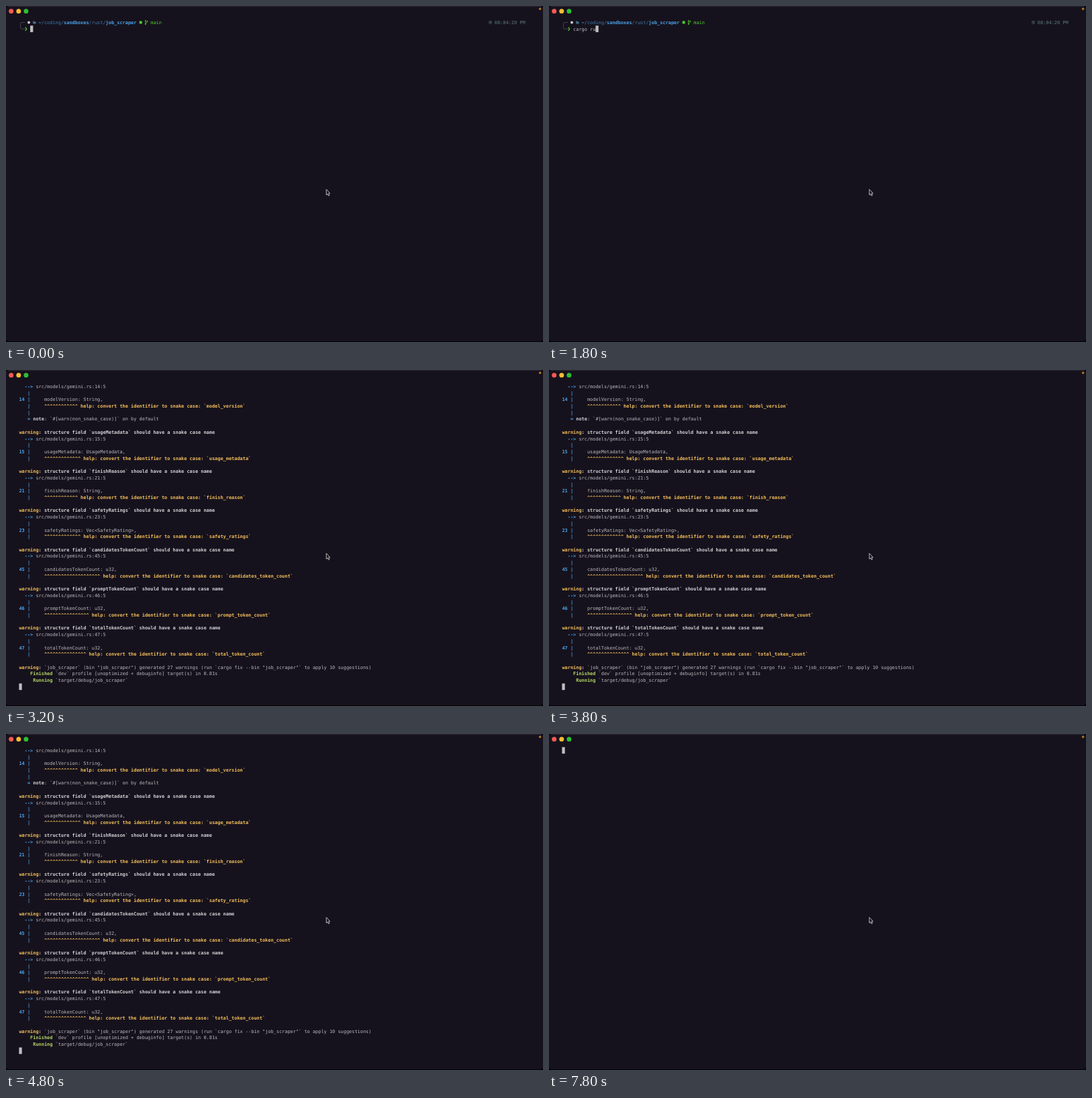
Write an HTML page with a canvas that moves like this. It is 800 px wide and 500 px high and loops after 8 s.

```html
<!DOCTYPE html>
<html lang="en">
<head>
<meta charset="utf-8">
<title>Terminal session</title>
<style>
  html, body { margin: 0; width: 100%; height: 100%; overflow: hidden; background: #000; }
  canvas { display: block; }
</style>
</head>
<body>
<canvas id="stage" width="800" height="500"></canvas>
<script>
const ctx = document.getElementById('stage').getContext('2d');
const LOOP = 8000, LEFT = 19.4, TOP = 19.5, CELL = 4.167, ROW = 9.717, SIZE = 6.92;
const TEXT = '#b9b8bc', BRIGHT = '#d2d1d5', YELLOW = '#f3be5a', BLUE = '#4ba3ea',
      PATH = '#3f7cab', GREEN = '#51c92d', LIME = '#b3d465', FRAME = '#5b595f', CLOCK = '#5b7c7c';

const COMMAND = 'cargo run';
const KEY_TIMES = [200, 400, 800, 1000, 1200, 1400, 1600, 1800, 2000];
const ENTER = 2200, OUTPUT = 3200, BANNER = 5200, CLEAR = 7800;

const FIELDS = [
  ['modelVersion', 'String', 14],
  ['usageMetadata', 'UsageMetadata', 15],
  ['finishReason', 'String', 21],
  ['safetyRatings', 'Vec<SafetyRating>', 23],
  ['candidatesTokenCount', 'u32', 45],
  ['promptTokenCount', 'u32', 46],
  ['totalTokenCount', 'u32', 47],
];

const LOGO = String.raw`
       __           __     _____    __            __    __
      / /  ____    / /_   / ___/   / /_   ___    / /   / /
 __  / /  / __ \  / __ \  \__ \   / __ \ / _ \  / /   / /
/ /_/ /  / /_/ / / /_/ / ___/ /  / / / //  __/ / /   / /
\____/   \____/ /_.___/ /____/  /_/ /_/ \___/ /_/   /_/`.split('\n').slice(1);

const cellX = col => LEFT + col * CELL;
const rowY = row => TOP + row * ROW;

// Writes text on the character grid and returns the next free column.
function put(row, col, text, color = TEXT, bold = false) {
  ctx.font = `${bold ? 'bold ' : ''}${SIZE}px "DejaVu Sans Mono", monospace`;
  ctx.fillStyle = color;
  for (const char of text) {
    if (char !== ' ') ctx.fillText(char, cellX(col), rowY(row) + 7.35);
    col++;
  }
  return col;
}

function dot(x, y, r, color) {
  ctx.fillStyle = color;
  ctx.beginPath();
  ctx.arc(x, y, r, 0, 7);
  ctx.fill();
}

function line(d, color, width = 0.7) {
  ctx.strokeStyle = color;
  ctx.lineWidth = width;
  ctx.stroke(new Path2D(d));
}

function shape(d, color) {
  ctx.fillStyle = color;
  ctx.fill(new Path2D(d));
}

function cursor(row, col) {
  ctx.fillStyle = '#bfbec2';
  ctx.fillRect(cellX(col), rowY(row), 4.3, 9.7);
}

function drawWindow() {
  ctx.fillStyle = '#000';
  ctx.fillRect(0, 0, 800, 500);
  ctx.fillStyle = '#16121d';
  ctx.beginPath();
  ctx.roundRect(0, 0, 800, 499, 4);
  ctx.fill();
  ctx.fillStyle = '#35323b';
  ctx.fillRect(3, 0, 794, 0.7);
  dot(7.7, 7.7, 3.5, '#fb5a50');
  dot(18.8, 7.7, 3.5, '#fbbb35');
  dot(29.9, 7.7, 3.5, '#2cbf35');
  dot(795.6, 4.3, 1.7, '#b9761f');
}

function drawPrompt() {
  line('M28 24.5H23.5Q21.5 24.5 21.5 26.5V32Q21.5 34.2 23.5 34.2H28', FRAME);
  line('M28.7 31.6L30.7 34.2L28.7 36.8', GREEN, 1.3);
  dot(34, 24.4, 2, '#cfced2');
  shape('M40.3 22.5H42L42.6 23.2H44L45 24.7L44 26.5H40.3Z', '#43718f');

  let col = put(0, 7, '~', BLUE, true);
  col = put(0, col, '/coding/', PATH);
  col = put(0, col, 'sandboxes', BLUE, true);
  col = put(0, col, '/rust/', PATH);
  put(0, col, 'job_scraper', BLUE, true);

  ctx.fillStyle = GREEN;
  ctx.fillRect(198.7, 22.4, 4, 4);
  line('M207.8 22V27.2M207.8 25.5Q210.4 25.3 210.4 23', GREEN, 0.8);
  dot(207.8, 21.9, 0.9, GREEN);
  dot(207.8, 27, 0.9, GREEN);
  dot(210.4, 22.7, 0.9, GREEN);
  put(0, 47, 'main', GREEN);

  line('M719.5 24.4a2 2 0 1 0 4 0a2 2 0 1 0 -4 0M721.5 23.2V24.5H722.5', CLOCK, 0.7);
  put(0, 170, '08:04:20 PM', CLOCK);
}

function drawField([name, type, lineNo], row) {
  const snake = name.replace(/[A-Z]/g, c => '_' + c.toLowerCase());
  put(row, 2, '-->', BLUE, true);
  put(row, 6, `src/models/gemini.rs:${lineNo}:5`);
  for (const r of [1, 2, 3]) put(row + r, 3, '|', BLUE, true);
  put(row + 2, 0, String(lineNo), BLUE, true);
  put(row + 2, 9, `${name}: ${type},`);
  put(row + 3, 9, `${'^'.repeat(name.length)} help: convert the identifier to snake case: \`${snake}\``, YELLOW, true);
}

function drawOutput() {
  FIELDS.forEach((field, i) => {
    const row = i ? 2 + i * 6 : 0;
    if (i) {
      const col = put(row - 1, 0, 'warning', YELLOW, true);
      put(row - 1, col, `: structure field \`${field[0]}\` should have a snake case name`, BRIGHT, true);
    }
    drawField(field, row);
  });
  put(4, 3, '|', BLUE, true);
  put(5, 3, '=', BLUE, true);
  put(5, put(5, 5, 'note', BRIGHT, true), ': `#[warn(non_snake_case)]` on by default');

  const col = put(43, put(43, 0, 'warning', YELLOW, true), ':', BRIGHT, true);
  put(43, col, ' `job_scraper` (bin "job_scraper") generated 27 warnings (run `cargo fix --bin "job_scraper"` to apply 10 suggestions)');
  put(44, put(44, 4, 'Finished', LIME, true), ' `dev` profile [unoptimized + debuginfo] target(s) in 0.81s');
  put(45, put(45, 5, 'Running', LIME, true), ' `target/debug/job_scraper`');
}

function drawPointer() {
  const arrow = 'M477.2 272.8V281.2L479.1 279.5L480.4 282.4L481.8 281.8L480.5 278.9H482.7Z';
  shape(arrow, '#0b090e');
  line(arrow, '#e4e4e6', 0.8);
}

function draw(t) {
  drawWindow();
  if (t < OUTPUT) {
    const typed = KEY_TIMES.filter(key => t >= key).length;
    drawPrompt();
    put(1, 4, COMMAND.slice(0, typed));
    if (t < ENTER) cursor(1, 4 + typed);
    else cursor(2, 0);
  } else if (t < BANNER) {
    drawOutput();
    cursor(46, 0);
  } else if (t < CLEAR) {
    LOGO.forEach((text, row) => put(row, 0, text));
    cursor(7, 0);
  } else {
    cursor(0, 0);
  }
  drawPointer();
}

ctx.textRendering = 'geometricPrecision';
const start = performance.now();
function tick() {
  draw((performance.now() - start) % LOOP);
  requestAnimationFrame(tick);
}
tick();
</script>
</body>
</html>
```
